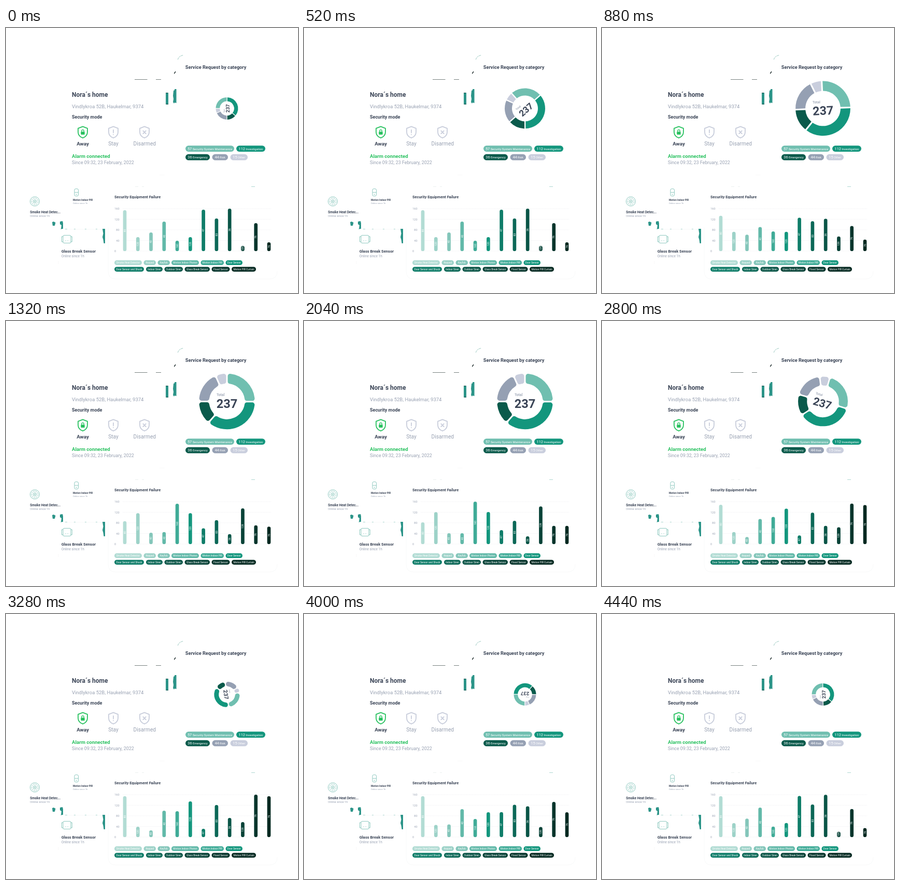
An HTML page that plays this animation: 563 by 512 pixels, repeating every 4480 ms.

```html
<!DOCTYPE html>
<html lang="en">
<head>
<meta charset="utf-8">
<title>Home security dashboard</title>
<style>
  html, body { margin: 0; width: 100%; height: 100%; overflow: hidden; background: #fff; }
  svg { display: block; width: 563px; height: 512px; font-family: Roboto, "Liberation Sans", sans-serif; }
  .b { font-weight: 700; fill: #3a4456; }
  .g { fill: #98a1b2; }
  .mid { text-anchor: middle; }
  .chip { fill: #fff; }
  .line { fill: none; stroke: #45a495; stroke-width: .6; }
  .shield { fill: none; stroke-width: 1.8; stroke-linejoin: round; stroke-linecap: round; }
  .teal { fill: #2b9488; }
  .faint { fill: none; stroke: #f7f8f8; stroke-width: .8; }
</style>
</head>
<body>
<svg viewBox="0 0 563 512">
  <defs>
    <path id="shield" d="M0-10.9 9-7.5V-.4C9 5.300 5.100 9.200 0 11.100-5.100 9.200-9 5.300-9-.4V-7.500Z"/>
  </defs>

  <!-- card edges -->
  <path class="faint" d="M197 385V470Q197 485 212 485H508Q523 485 523 470M112 389H186M101 450V456M296 284H305"/>
  <path d="M331.300 61Q333 54 342 52.500" fill="none" stroke="#6fb0a5" stroke-width=".7" stroke-dasharray="4 .8"/>
  <path d="M327 83 327 85.500 324.500 89 324 87Z" fill="#1d2b2b"/>
  <path d="M248 99.500H272.500M289 99.500H299" stroke="#56615f" stroke-width=".8"/>
  <path class="teal" d="M308 125H313V147.500H308Z"/>
  <path d="M308 125.500H312M308.500 147H313" stroke="#174f4a" stroke-width="1"/>
  <path class="teal" d="M323 121 325 120V118H328.500V145L325 144 324 146 322 143 323 137 322 131Z"/>
  <path class="teal" d="M89 375 92 374 95.500 376 94 382H90Z"/>
  <path class="teal" d="M104 374 109 373 110 377V388H106L107 381 104 379Z"/>
  <path class="teal" d="M186 388H191V416H188.500L187.500 409 186 404 187.500 397Z"/>
  <path d="M105 388.500H108M114 388.500H118M131 388.500H134M152 388.500H155M173 388.500H176M473 306.500H480" stroke="#8cc8bf" stroke-width=".7"/>
  <path d="M249 306.500H255M262 306.500H266" stroke="#dfe8e6" stroke-width=".6"/>

  <!-- home card -->
  <text class="b" x="127" y="132.500" font-size="12">Nora´s home</text>
  <text class="g" x="127" y="154.500" font-size="9.500">Vindlykroa 52B, Haukelmar, 9374</text>
  <text class="b" x="127" y="175.300" font-size="9">Security mode</text>
  <g class="shield" stroke="#28c15f" transform="translate(148 201.300)">
    <use href="#shield"/>
    <path d="M-2.200-1V-2.500A2.200 2.200 0 0 1 2.200-2.500V-1" stroke-width="1.300"/>
    <rect x="-3.700" y="-1" width="7.400" height="5.700" rx="1" fill="#28c15f" stroke="none"/>
  </g>
  <g class="shield" stroke="#c8cddb">
    <g transform="translate(207 201.300)"><use href="#shield"/><path d="M0-4.500V1M0 4.300V4.500"/></g>
    <g transform="translate(267 201.300)"><use href="#shield"/><path d="M-2.700-2.700 2.700 2.700M2.700-2.700-2.700 2.700"/></g>
  </g>
  <g class="mid" font-size="10.200">
    <text class="b" x="148" y="226.500" font-size="9.800">Away</text>
    <text class="g" x="207" y="226.500">Stay</text>
    <text class="g" x="267.300" y="226.500">Disarmed</text>
  </g>
  <text x="127" y="250.500" font-size="9.600" font-weight="700" fill="#28c15f">Alarm connected</text>
  <text class="g" x="127" y="263.200" font-size="8.850">Since 09:32, 23 February, 2022</text>

  <!-- device cards -->
  <g class="line" transform="translate(55.500 335)">
    <circle r="9"/>
    <circle r="6.300" stroke-dasharray="3 1.300"/>
    <circle r="3.200"/><circle r="1"/>
  </g>
  <text class="b" x="46.300" y="357.800" font-size="6.400">Smoke Heat Detec...</text>
  <text class="g" x="46.300" y="365" font-size="5.600">Online since 1h</text>
  <g class="line">
    <rect x="132" y="310.700" width="7.500" height="14" rx="2.500"/>
    <path d="M132.500 317.700H139M134.500 321.500H137"/>
  </g>
  <text class="b" x="129" y="334.200" font-size="4.700">Motion Indoor PIR</text>
  <text class="g" x="129" y="340" font-size="4.200">Online since 1h</text>
  <g class="line">
    <rect x="110" y="400.500" width="15" height="15" rx="2"/>
    <path d="M110 403H107.500V413H110M125 403H127.300V413H125M114.500 411H116M118.500 411H120"/>
  </g>
  <text class="b" x="106.700" y="433.800" font-size="7.560">Glass Break Sensor</text>
  <text class="g" x="106.700" y="443" font-size="6.500">Online since 1h</text>

  <!-- requests card -->
  <text class="b" x="345.800" y="78.700" font-size="9.180">Service Request by category</text>
  <g id="ring"></g>
  <g id="total">
    <text class="g" x="-20" y="-10.500" font-size="7" font-weight="500">Total</text>
    <text class="b mid" y="12.600" font-size="23.600" font-weight="900">237</text>
  </g>
  <g id="tags"></g>

  <!-- failure chart -->
  <text class="b" x="209" y="328.700" font-size="7.400">Security Equipment Failure</text>
  <g id="axis"></g>
  <g id="bars"></g>
  <g id="legend"></g>
</svg>
<script>
const LOOP = 4480;
const $ = id => document.getElementById(id);

function add(parent, tag, attrs, text) {
  const el = document.createElementNS('http://www.w3.org/2000/svg', tag);
  for (const k in attrs) el.setAttribute(k, attrs[k]);
  if (text !== undefined) el.textContent = text;
  parent.appendChild(el);
  return el;
}

// Quadratic ease in and out over one second from `start`.
function ease(t, start) {
  const x = Math.min(1, Math.max(0, (t - start) / 1000));
  return x < .5 ? 2 * x * x : 1 - 2 * (1 - x) * (1 - x);
}

const pill = (parent, x, y, w, h, fill) =>
  add(parent, 'rect', { x, y, width: w, height: h, rx: Math.min(w, h) / 2, fill });

// Ring
const RING = { x: 426, y: 155.4, outer: 53.8, inner: 34.5 };
const SLICES = [
  [0, 90.5, '#70bfb0'], [90.5, 221, '#13967d'], [221, 270, '#0a5a4b'],
  [270, 336, '#95a0b3'], [336, 360, '#c9cedd']
].map(([from, to, color]) => ({
  from, to,
  el: add($('ring'), 'path', { fill: color, stroke: color, 'stroke-linejoin': 'round' })
}));

function slicePath(from, to, outer, inner, inset) {
  const rad = Math.PI / 180, half = (to - from) / 2 * rad, mid = (from + to) / 2 * rad;
  const point = (r, side) => {
    const a = mid + side * Math.max(.005, half - Math.asin(Math.min(1, inset / r)));
    return (r * Math.sin(a)).toFixed(3) + ' ' + (-r * Math.cos(a)).toFixed(3);
  };
  const arc = (r, sweep, end) => `A${r} ${r} 0 0 ${sweep} ${end}`;
  return 'M' + point(outer, -1) + arc(outer, 1, point(outer, 1)) +
    'L' + point(inner, 1) + arc(inner, 0, point(inner, -1)) + 'Z';
}

function drawRing(t) {
  const scale = .4 + .6 * (ease(t, 0) - ease(t, 2500));
  const turn = -90 + 90 * ease(t, 0) + 90 * ease(t, 2500) + 180 * ease(t, 3500);
  const round = t >= 1000 && t < 3500;
  const outer = RING.outer * scale, inner = RING.inner * scale;
  const gap = round ? 1.2 + 1.8 * scale : 3.2 * scale;
  const place = `translate(${RING.x} ${RING.y}) rotate(${turn})`;
  for (const s of SLICES) {
    const half = (s.to - s.from) * Math.PI / 360;
    const room = (outer + inner) / 2 * Math.sin(half) - gap / 2;
    const r = round ? Math.min(4.5, (outer - inner) / 2 - .1, room) : 0;
    s.el.setAttribute('d', slicePath(s.from, s.to, outer - r, inner + r, gap / 2 + r));
    s.el.setAttribute('stroke-width', 2 * r);
  }
  $('ring').setAttribute('transform', place);
  $('total').setAttribute('transform', place + ` scale(${scale})`);
}

// Request tags: x, y, width, color, count, label
[
  [346, 227.2, 94, '#70bfb0', 57, 'Security System Maintenance'],
  [444, 227.2, 56, '#13967d', 112, 'Investigation'],
  [346, 243.8, 47, '#0a5a4b', 36, 'Emergency'],
  [397.5, 243.8, 30.5, '#95a0b3', 44, 'Risk'],
  [432.5, 243.8, 33.5, '#c9cedd', 15, 'Other']
].forEach(([x, y, w, color, count, label]) => {
  pill($('tags'), x, y, w, 11.8, color);
  const text = add($('tags'), 'text', { class: 'chip mid', x: x + w / 2, y: y + 8.5, 'font-size': 5.8 });
  add(text, 'tspan', { 'font-size': 7.3 }, count);
  add(text, 'tspan', {}, ' ' + label);
});

// Bars
const BASE = 431, BAR = 6.7;
for (let v = 0; v <= 160; v += 40) {
  const y = BASE - v * .5125;
  add($('axis'), 'path', { d: `M225 ${y}H511`, stroke: '#ededf0', 'stroke-width': .6, 'stroke-dasharray': '2 1' });
  add($('axis'), 'text', { class: 'g', x: 218.5, y: y + 2, 'font-size': 5.5, 'text-anchor': v ? 'end' : 'middle', dx: v ? 0 : -8 }, v);
}

const COLORS = ['#b2dcd4', '#9dd2c8', '#84c6ba', '#62b9a9', '#3fab97', '#13967d',
  '#0f7d69', '#0c6857', '#0a5547', '#084338', '#06352c', '#052921'];
const LABELS = [80, 120, 40, 40, 160, 120, 47, 83, 36, 139, 76, 76];
const TOPS = [
  [352, 404, 395, 374, 411, 404, 351, 368, 349, 421, 377, 414],
  [389, 369, 410, 410, 349, 369, 404, 386, 416, 358, 396, 396],
  [352, 411, 418, 380, 381, 362, 415, 369, 394, 402, 349, 352]
];
const BARS = COLORS.map((color, i) => {
  const x = 229 + i * 25.27;
  return {
    x,
    rect: pill($('bars'), x - BAR / 2, 0, BAR, BAR, color),
    text: add($('bars'), 'text', { class: 'chip mid', y: 1.7, 'font-size': 4.9 }, LABELS[i])
  };
});

function drawBars(t) {
  const a = ease(t, 500), b = ease(t, 2000), c = ease(t, 3500);
  BARS.forEach(({ x, rect, text }, i) => {
    const [p, q, r] = TOPS.map(row => row[i]);
    const top = p + (q - p) * a + (r - q) * b + (p - r) * c;
    rect.setAttribute('y', top);
    rect.setAttribute('height', BASE - top);
    text.setAttribute('transform', `translate(${x} ${(top + BASE) / 2}) rotate(-90)`);
  });
}

// Legend: x, width, label
[
  [209, 53, 'Smoke Heat Detector'], [265.5, 23.5, 'Keypad'], [292.5, 23.5, 'Keyfob'],
  [319, 53, 'Motion Indoor Photon'], [375.5, 44.5, 'Motion Indoor PIR'], [423.5, 32.5, 'Door Sensor'],
  [209, 57, 'Door Sensor and Shock'], [270, 32, 'Indoor Siren'], [305.5, 35.5, 'Outdoor Siren'],
  [344.5, 48.5, 'Glass Break Sensor'], [396.5, 35, 'Flood Sensor'], [435, 47, 'Motion PIR Curtain']
].forEach(([x, w, label], i) => {
  const y = i < 6 ? 448.8 : 461.5;
  pill($('legend'), x, y, w, 9.2, COLORS[i]);
  add($('legend'), 'text', { class: 'chip mid', x: x + w / 2, y: y + 6.3, 'font-size': 4.8 }, label);
});

const begin = performance.now();
function frame() {
  const t = (performance.now() - begin) % LOOP;
  drawRing(t);
  drawBars(t);
  requestAnimationFrame(frame);
}
frame();
</script>
</body>
</html>
```
